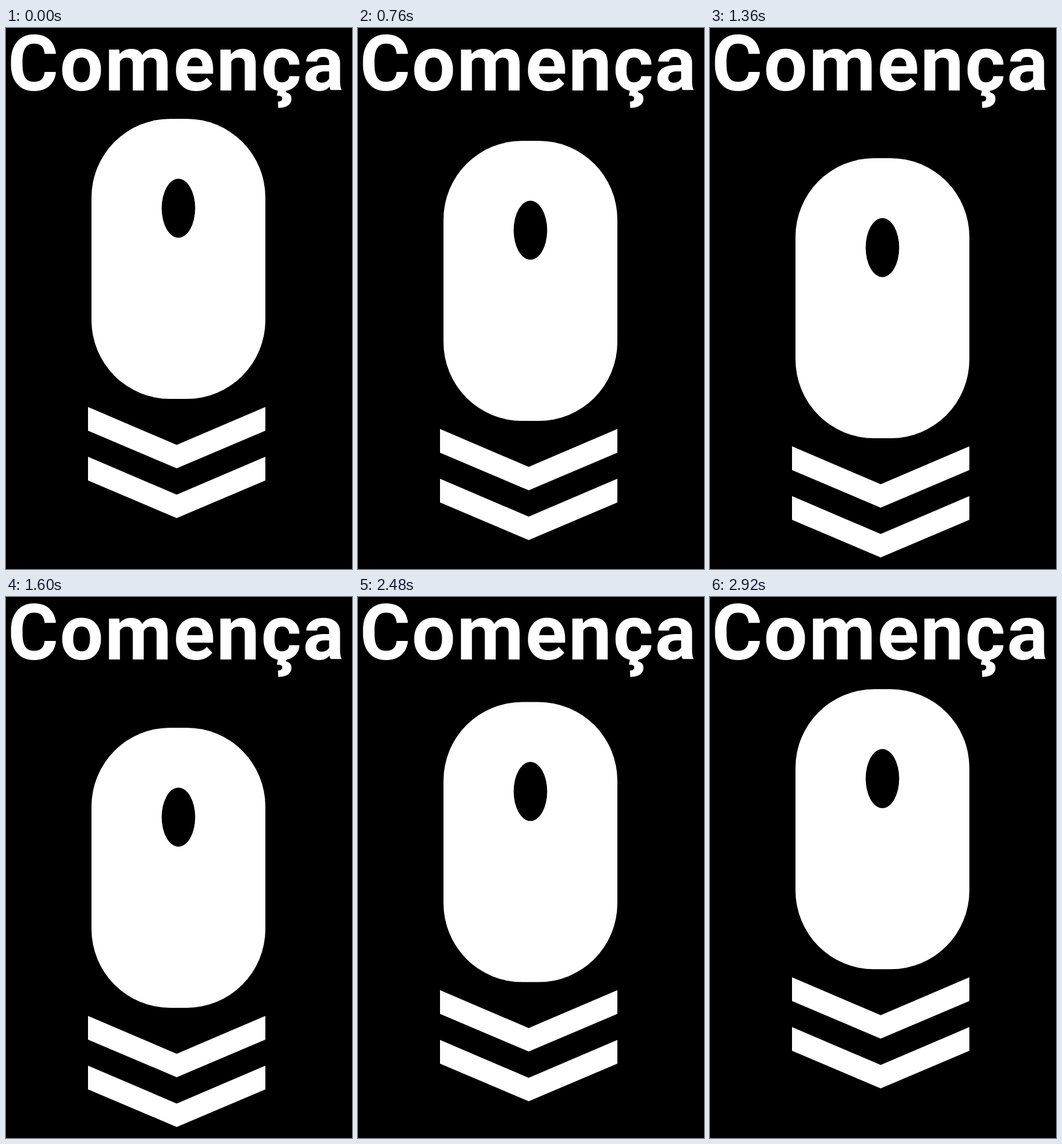
Recreate the animation shown at these times as an HTML page. Size 599x935 px, loop 2960 ms.

```html
<!DOCTYPE html>
<html lang="ca">
<head>
<meta charset="utf-8">
<style>
html, body { margin: 0; width: 100%; height: 100%; overflow: hidden; background: #000; }
svg { display: block; width: 599px; height: 935px; fill: #fff; }
text { font: 700 134px Roboto, "Open Sans", sans-serif; letter-spacing: 2.3px; }
</style>
</head>
<body>
<svg viewBox="0 0 599 935">
  <text x="3" y="108">Comença</text>
  <g id="mouse">
    <rect x="148" y="157" width="301" height="484" rx="136"/>
    <ellipse cx="298.5" cy="311.5" rx="29" ry="51" fill="#000"/>
    <path id="chevron" d="M142 655L295.5 720.5L449 655V696L295.5 761L142 696Z"/>
    <use href="#chevron" y="86"/>
  </g>
</svg>
<script>
const LOOP = 2960, STEP = 40, TURN = 1490, DROP = 74.5, END = 0.3;
const mouse = document.getElementById("mouse");
const start = performance.now();

// Steady drop, then a steady rise that stops just short of the start.
function offset(t) {
  return t < TURN
    ? DROP * t / TURN
    : DROP + (END - DROP) * (t - TURN) / (LOOP - TURN);
}

function draw() {
  const t = (performance.now() - start) % LOOP;
  const y = offset(Math.floor(t / STEP) * STEP);
  mouse.setAttribute("transform", `translate(0 ${y})`);
  requestAnimationFrame(draw);
}
draw();
</script>
</body>
</html>
```
